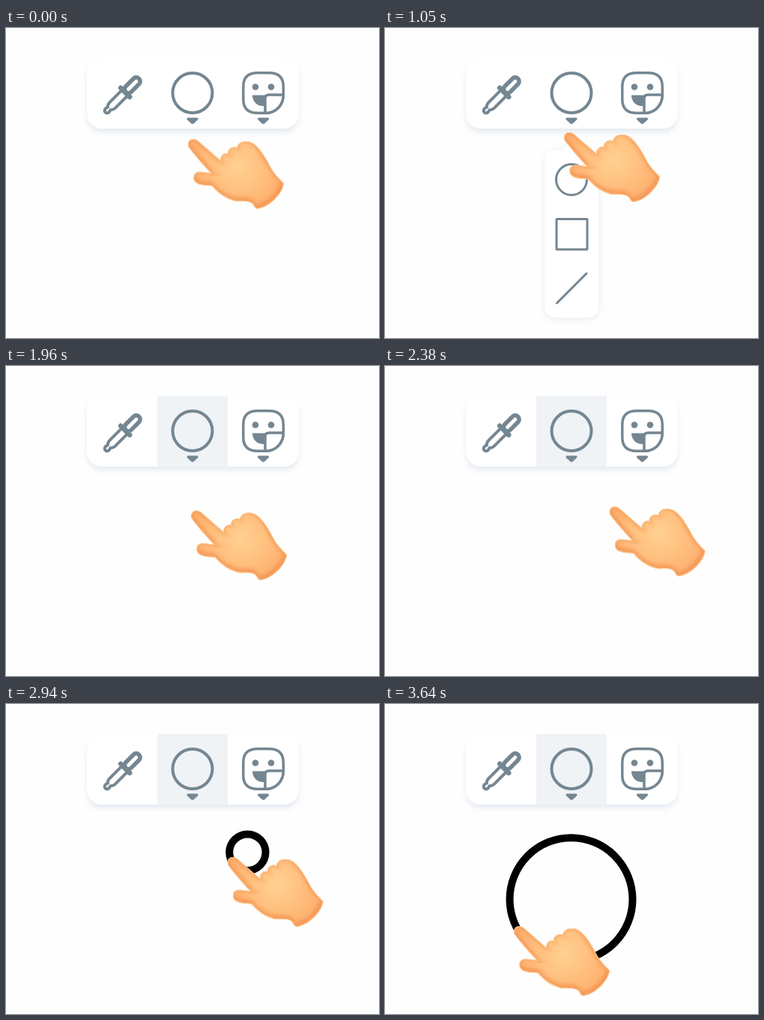
Animation of 498 by 413 pixels, one loop 4060 ms. Source, as an HTML page:

```html
<!DOCTYPE html>
<html lang="en">
<head>
<meta charset="utf-8">
<title>Drawing a circle</title>
<style>
  html, body { margin: 0; width: 100%; height: 100%; overflow: hidden; background: #fefefe; }
  svg { display: block; width: 498px; height: 413px; }
  .panel { fill: #fff; }
  #bar { filter: drop-shadow(0 5px 3.5px rgba(110, 140, 185, .17)); }
  #popup .panel { filter: drop-shadow(0 2px 4px rgba(110, 140, 185, .18)); }
  .line { fill: none; stroke: #748691; stroke-linecap: round; stroke-linejoin: round; }
  .solid { fill: #748691; }
  #ring { fill: none; stroke: #000; stroke-width: 10; }
</style>
</head>
<body>
<svg viewBox="0 0 498 413">
  <defs>
    <path id="handShape" d="M.5 10 C-1 4 2 0 7 0 C11 0 13.5 2 16.500 5 L43 28
      C43 22 48 18 53 19 C53 13 59 9 65 11 C67 5 72 2.500 78 3 C85 2.500 91 8 95 13
      C101 20 104 26 107 31 C113 44 120 51 128 59 C127 71 111 90 93 93
      C89 93 88 88 86 86 C80 81 71 84 62 82.500 C50 79 41 73 32 62.500
      C25 62 17 62 12 59 C5 55 6 44 15 43.500 C21 43.500 25 45 30 45
      C21 35 7 20 .5 10 Z"/>
    <clipPath id="handClip"><use href="#handShape"/></clipPath>
    <radialGradient id="skin" gradientUnits="userSpaceOnUse" cx="66" cy="36" r="68">
      <stop offset="0" stop-color="#ffd192"/>
      <stop offset=".55" stop-color="#ffbe7d"/>
      <stop offset="1" stop-color="#fdad6c"/>
    </radialGradient>
    <filter id="soft" x="-20%" y="-20%" width="140%" height="140%">
      <feGaussianBlur stdDeviation="2.4"/>
    </filter>
    <filter id="fine" x="-20%" y="-20%" width="140%" height="140%">
      <feGaussianBlur stdDeviation=".7"/>
    </filter>
    <path id="arrow" class="solid" d="M243 119.500 H255 Q257.500 120 256 122.200 L251 127 Q249 128.700 247 127 L242 122.200 Q240.500 120 243 119.500 Z"/>
  </defs>

  <rect id="bar" class="panel" x="108" y="40" width="283" height="94" rx="20"/>
  <rect id="active" x="202" y="40" width="94" height="94" fill="#eff3f6"/>

  <g transform="translate(156 89) rotate(45)">
    <path class="line" stroke-width="4" d="M-5.300 -3 V20 Q-5.300 23.500 -2.500 26 Q-4 29 -3 31 Q-2 33 0 33 Q2 33 3 31 Q4 29 2.500 26 Q5.300 23.500 5.300 20 V-3"/>
    <rect class="line" stroke-width="5.600" x="-5.200" y="-30.500" width="10.400" height="25" rx="5.200"/>
    <path class="line" stroke-width="6.500" d="M-8.500 -4.500 H8.500"/>
  </g>

  <circle class="line" stroke-width="4" cx="249" cy="86.500" r="26.500"/>
  <use href="#arrow"/>

  <g class="line" stroke-width="3.500">
    <path d="M336 59.800 H351 Q370.300 59.800 370.300 78 V89 C370.300 103 360 113.300 346 113.300 H336 Q316.800 113.300 316.800 95 V78 Q316.800 59.800 336 59.800 Z"/>
    <path class="solid" stroke="none" d="M329 89.500 H347 V104 H343.500 C335 104 329 98 329 89.500 Z"/>
    <path d="M370.300 89 H351 Q346 89 346 94 V113.300 C360 113.300 370.300 103 370.300 89 Z" fill="#fff"/>
    <circle class="solid" stroke="none" cx="333" cy="78.500" r="4.300"/>
    <circle class="solid" stroke="none" cx="354" cy="78.500" r="4.300"/>
  </g>
  <use href="#arrow" x="94.500"/>

  <g id="popup">
    <path class="panel" d="M229 163 H232 C240 163 244 150 249 150 C254 150 258 163 266 163 H269 Q285 163 285 179 V370 Q285 386 269 386 H229 Q213 386 213 370 V179 Q213 163 229 163 Z"/>
    <g class="line" stroke-width="3">
      <circle cx="249" cy="202" r="20.500"/>
      <rect x="229" y="254.500" width="41" height="40.500" rx="1"/>
      <path d="M229.500 366.500 L269 327"/>
    </g>
  </g>

  <circle id="ring"/>

  <g id="hand">
    <use href="#handShape" fill="url(#skin)"/>
    <g clip-path="url(#handClip)" fill="none" stroke="#f08a48">
      <g transform="translate(-1.500 -2.500)">
        <use href="#handShape" stroke-width="6" opacity=".7" filter="url(#soft)"/>
      </g>
      <path d="M30 45 Q36 49 42 48" stroke-width="3" opacity=".5" filter="url(#soft)"/>
      <path d="M43 28 Q46 32 51 33 M53 19 Q55 23 60 24 M65 11 Q67 15 71 16" stroke-width="3" opacity=".35" filter="url(#soft)"/>
      <use href="#handShape" stroke="#ffd9a6" stroke-width="2" opacity=".7" filter="url(#fine)"/>
    </g>
  </g>
</svg>

<script>
  const LOOP = 4060, STEP = 70;
  const POPUP_ON = 490, SELECT = 1540, POPUP_OFF = 1890;
  const DRAW_START = 2680, DRAW_END = 3640;

  const easeIn = p => p * p;
  const easeOut = p => 1 - (1 - p) ** 2;
  const easeBoth = p => (1 - Math.cos(Math.PI * p)) / 2;

  // time, x, y, easing used to arrive
  const path = [
    [0, 243, 148],
    [420, 241, 98, easeBoth],
    [770, 241, 98, easeBoth],
    [1050, 239, 139, easeIn],
    [1330, 242, 194, easeOut],
    [1400, 242, 190, easeBoth],
    [1490, 242, 195, easeBoth],
    [1610, 242, 193, easeBoth],
    [1820, 242, 193, easeBoth],
    [DRAW_START, 321, 185, easeBoth],
    [DRAW_END, 172, 296, easeBoth],
    [LOOP, 172, 296, easeBoth]
  ];

  const el = id => document.getElementById(id);
  const [hand, ring, popup, active] = ["hand", "ring", "popup", "active"].map(el);
  const show = (node, on) => node.setAttribute("visibility", on ? "visible" : "hidden");

  function handAt(t) {
    const i = path.findIndex(key => key[0] > t);
    const [t0, x0, y0] = path[i - 1];
    const [t1, x1, y1, ease] = path[i];
    const p = ease((t - t0) / (t1 - t0));
    return [x0 + (x1 - x0) * p, y0 + (y1 - y0) * p];
  }

  function render(t) {
    const [x, y] = handAt(t);
    hand.setAttribute("transform", `translate(${x} ${y})`);
    show(popup, t >= POPUP_ON && t < POPUP_OFF);
    show(active, t >= SELECT);
    show(ring, t > DRAW_START);
    if (t <= DRAW_START) return;

    // the fingertip stays on the rim while the ring grows
    const p = easeBoth(Math.min(1, (t - DRAW_START) / (DRAW_END - DRAW_START)));
    const r = 82 * p ** 0.69;
    ring.setAttribute("r", r);
    ring.setAttribute("cx", x + 6 + r * 0.86);
    ring.setAttribute("cy", y + 6 - r * 0.51);
  }

  const start = performance.now();
  function tick() {
    const t = (performance.now() - start) % LOOP;
    render(Math.floor(t / STEP) * STEP);
    requestAnimationFrame(tick);
  }
  tick();
</script>
</body>
</html>
```
